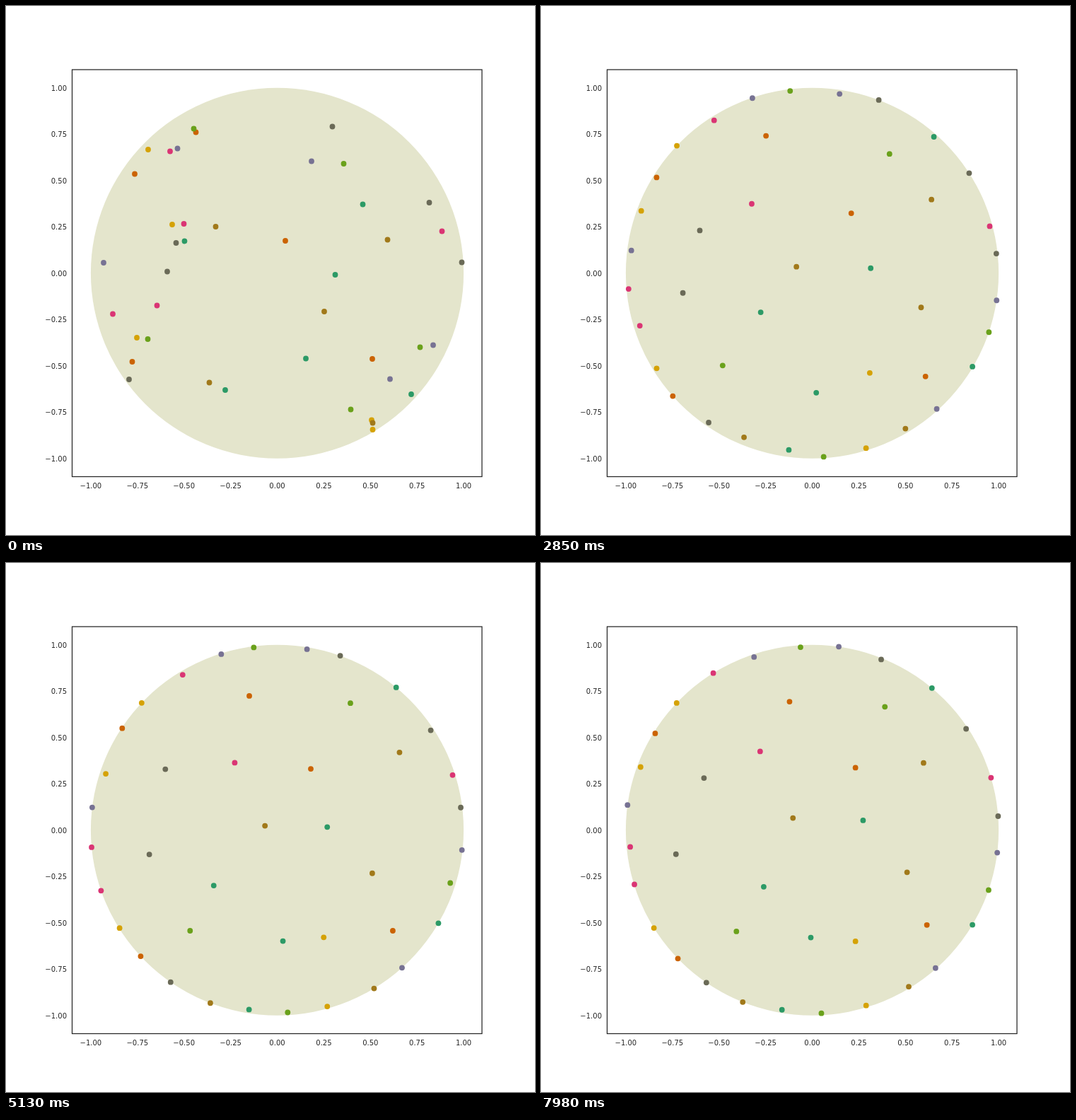
Animation, 748 px wide and 748 px high, one loop 8 s. Source, as an HTML page:

```html
<!DOCTYPE html>
<html lang="en">
<head>
<meta charset="utf-8">
<title>Points spreading in a disc</title>
<style>
  html, body { margin: 0; width: 100%; height: 100%; overflow: hidden; background: #fff; }
  svg { display: block; width: 100%; height: 100%; }
  text { font: 10px "DejaVu Sans", sans-serif; fill: #262626; }
</style>
</head>
<body>
<svg viewBox="0 0 748 748">
  <ellipse cx="383.5" cy="377.7" rx="263.6" ry="262" fill="#e4e5cc"/>
  <g id="dots"></g>
  <rect x="93.5" y="90" width="579.5" height="575.5" fill="none" stroke="#262626" stroke-width="1.25"/>
  <g id="labels"></g>
</svg>
<script>
const LOOP = 8000, STEP = 190, STEPS = 43;
const CX = 383.5, CY = 377.7, RX = 263.6, RY = 262;
const SETTLE = 5; // time constant, in steps

// Each dot: start x, y, then where it settles: a rim angle in degrees, or an inner x, y.
const groups = {
  "#2c9a66": [[504.5, 280.5, 50.7], [252.5, 332.5, 305, 452], [465.5, 380, 465, 378],
              [424, 498.5, 377, 538], [310, 543, 261], [573, 549, -30.6]],
  "#cb6302": [[268.5, 178.5, 334, 193], [182, 237.5, 147.5], [395, 332, 434, 289],
              [178.5, 503, 223.6], [518, 499, 548, 519]],
  "#777293": [[242.5, 201.5, 108.4], [432, 219.5, 80.8], [138, 363, 173],
              [604, 479.5, -6.8], [543, 527.5, -47.1]],
  "#da3574": [[232, 205.5, 121.7], [251.5, 308, 315, 273], [616.5, 318.5, 17.2],
              [151, 435.5, 184.4], [213.5, 423.5, 197.5]],
  "#6aa11b": [[265.5, 173.5, 95.6], [477.5, 223, 486, 199], [585.5, 482.5, -18.7],
              [200.5, 471, 264, 521], [487.5, 570.5, -87]],
  "#d5a206": [[201, 203, 135.9], [235, 309, 160], [185, 469, 210.8],
              [517, 585.5, 455, 534], [518.5, 599, -73]],
  "#a1791a": [[296.5, 312, 357, 369], [539.5, 330.5, 545, 279], [450, 432, 528, 437],
              [287.5, 532.5, 247.7], [518.5, 589.5, -59.4]],
  "#6a6a57": [[461.5, 170.5, 68.9], [598.5, 278, 33.1], [644.5, 362.5, 5.1],
              [240.5, 335, 227, 303], [228, 375.5, 197, 405], [174, 528, 235.6]]
};

let seed = 7;
const random = () => (seed = seed * 16807 % 2147483647) / 2147483647;
const kick = size => (random() * 2 - 1) * size;

function keepInside([x, y]) {
  const r = Math.max(1, Math.hypot((x - CX) / RX, (y - CY) / RY));
  return [CX + (x - CX) / r, CY + (y - CY) / r];
}

// A dot eases from its start to its resting place with a damped random walk on top.
function makePath([x, y, a, b]) {
  const onRim = b === undefined, angle = a * Math.PI / 180;
  const [restX, restY] = onRim ? [CX + RX * Math.cos(angle), CY - RY * Math.sin(angle)] : [a, b];
  const size = onRim ? 3.5 : 7;
  let dx = 0, dy = 0;
  return Array.from({ length: STEPS }, (_, step) => {
    if (step) {
      dx = dx * 0.85 + kick(size);
      dy = dy * 0.85 + kick(size);
    }
    const far = Math.exp(-step / SETTLE);
    return keepInside([restX + (x - restX) * far + dx, restY + (y - restY) * far + dy]);
  });
}

const dotLayer = document.getElementById("dots");
const paths = [];
for (const [color, dots] of Object.entries(groups)) {
  for (const dot of dots) {
    paths.push(makePath(dot));
    dotLayer.insertAdjacentHTML("beforeend", `<circle r="3.9" fill="${color}"/>`);
  }
}

let labels = "";
for (let v = -1; v <= 1; v += 0.25) {
  const name = v.toFixed(2).replace("-", "\u2212");
  labels += `<text x="${CX + v * RX}" y="681.6" text-anchor="middle">${name}</text>`
          + `<text x="86" y="${CY - v * RY + 3.8}" text-anchor="end">${name}</text>`;
}
document.getElementById("labels").innerHTML = labels;

const start = performance.now();
function draw() {
  const step = Math.floor((performance.now() - start) % LOOP / STEP);
  paths.forEach((path, i) => {
    const [x, y] = path[step];
    dotLayer.children[i].setAttribute("cx", x);
    dotLayer.children[i].setAttribute("cy", y);
  });
  requestAnimationFrame(draw);
}
draw();
</script>
</body>
</html>
```
